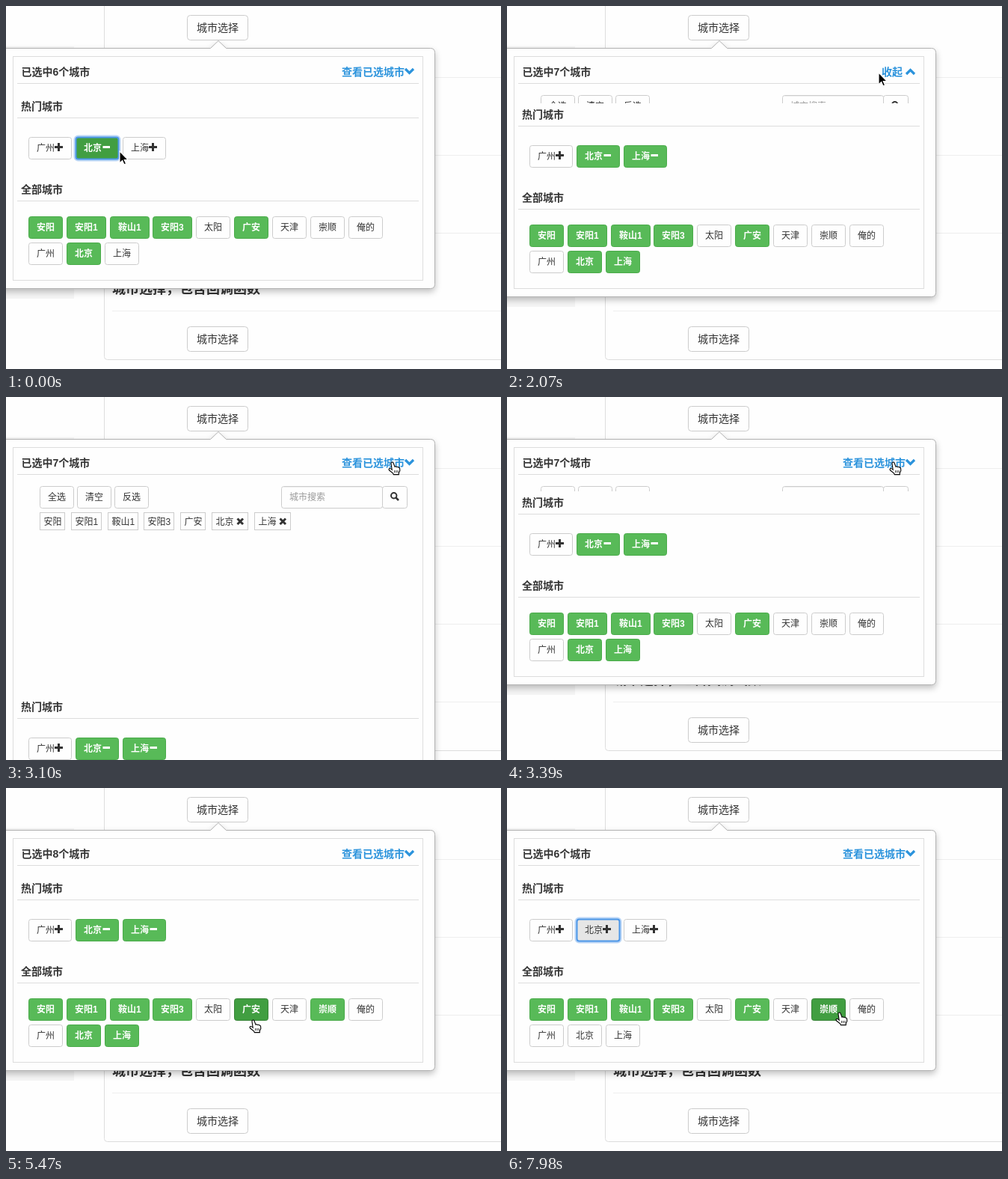
An HTML page that plays this animation: 662x485 px, repeating every 8000 ms.

```html
<!DOCTYPE html>
<html lang="zh-CN">
<head>
<meta charset="utf-8">
<title>城市选择</title>
<style>
html, body { margin: 0; width: 100%; height: 100%; overflow: hidden; background: #fefefe; }
svg { display: block; font-family: "Liberation Sans", "Noto Sans CJK SC", "Noto Sans CJK", sans-serif; }
.popover { filter: drop-shadow(0 4px 4px rgba(0, 0, 0, .24)); }
</style>
</head>
<body>
<svg id="stage" width="662" height="485" viewBox="0 0 662 485"></svg>
<script>
const stage = document.getElementById('stage');
const LOOP = 8000, STEP = 147.35;   // the screen is refreshed once per STEP
const OPEN_AT = 2014, CLOSE_AT = 3028, SLIDE = 400, PANEL = 300;
const BG = '#fefefe', INK = '#333', BLUE = '#2b93dc';

// pointer hot spot: [step, x, y]
const POINTER = [
  [0, 152, 194], [1, 166, 188], [2, 178, 185], [5, 186, 183], [6, 235, 166],
  [8, 365, 128], [10, 472, 98], [11, 472, 98], [12, 489, 91], [13, 496, 89],
  [14, 497, 89], [15, 503, 89], [17, 513, 89], [19, 516, 87], [23, 516, 87],
  [24, 510, 108], [25, 480, 180], [27, 418, 291], [28, 411, 298], [29, 408, 300],
  [30, 398, 300], [32, 340, 299], [33, 340, 299], [34, 350, 346], [35, 350, 346],
  [37, 330, 310], [40, 232, 222], [42, 178, 184], [44, 178, 184], [45, 165, 186],
  [46, 122, 187], [48, 120, 189], [49, 122, 205], [50, 128, 255], [51, 142, 300],
  [52, 230, 301], [53, 370, 301], [54, 444, 300]
];

// focused button: [from step, name]
const FOCUS = [[0, 'hot北京'], [3, 'hot上海'], [6, ''], [29, '崇顺'], [31, ''], [43, 'hot上海'], [47, 'hot北京']];

const HOT = ['广州', '北京', '上海'];
const CITIES = ['安阳', '安阳1', '鞍山1', '安阳3', '太阳', '广安', '天津', '崇顺', '俺的', '广州', '北京', '上海'];
const ALWAYS_ON = ['安阳', '安阳1', '鞍山1', '安阳3', '广安'];

const textWidth = name => name.length > 2 ? 30.67 : 24;

const buttons = HOT.map((name, i) => ({ name, id: 'hot' + name, hot: true, x: 30 + 63 * i, y: 175, w: 58 }));
let nextX = 30;
CITIES.forEach((name, i) => {
  if (i === 9) nextX = 30;
  const w = textWidth(name) + 22;
  buttons.push({ name, id: name, x: Math.round(nextX), y: i < 9 ? 281 : 316, w: Math.round(w) });
  nextX += w + 5;
});

const text = (s, x, y, size = 12, fill = INK, weight = 400) =>
  `<text x="${x}" y="${y}" font-size="${size}" fill="${fill}" font-weight="${weight}">${s}</text>`;
const box = (x, y, w, h, fill, stroke, r = 0, extra = '') =>
  `<rect x="${x + .5}" y="${y + .5}" width="${w - 1}" height="${h - 1}" rx="${r}" fill="${fill}" stroke="${stroke}" ${extra}/>`;
const hline = (x1, x2, y, color) => `<path d="M${x1} ${y + .5}H${x2}" stroke="${color}"/>`;
const line = (d, color, width) => `<path d="${d}" fill="none" stroke="${color}" stroke-width="${width}"/>`;
const plainButton = (s, x, y) => box(x, y, 46, 30, BG, '#ccc', 3) + text(s, x + 11, y + 19);
const inside = (p, b, off) => p.x >= b.x && p.x < b.x + b.w && p.y >= b.y + off && p.y < b.y + off + 30;

function pointerAt(k) {
  const i = Math.max(1, POINTER.findIndex(p => p[0] >= k));
  const [k0, x0, y0] = POINTER[i - 1], [k1, x1, y1] = POINTER[i];
  const f = (k - k0) / (k1 - k0);
  return { x: Math.round(x0 + (x1 - x0) * f), y: Math.round(y0 + (y1 - y0) * f) };
}

const swing = (t, start) => {
  const p = Math.min(1, Math.max(0, (t - start) / SLIDE));
  return .5 - Math.cos(p * Math.PI) / 2;
};

function isOn(name, k) {
  if (name === '上海') return k >= 3 && k < 44;
  if (name === '北京') return k < 47;
  if (name === '崇顺') return k >= 29;
  return ALWAYS_ON.includes(name);
}

function page(off) {
  const trigger = y => box(242, y, 82, 34, BG, '#ccc', 4) + text('城市选择', 255, y + 22, 14);
  return `<rect y="54" width="91" height="${337 + off}" fill="#f5f5f5"/>`
    + line('M131.5 0V468.5Q131.5 472.5 135.5 472.5H662', '#ddd', 1)
    + [95, 199, 303, 407].map(y => hline(142, 662, y, '#eee')).join('')
    + text('城市选择，包含回调函数', 142, 384, 18, INK, 700)
    + trigger(12) + trigger(428);
}

function popover(off) {
  const bottom = 377.5 + off;
  return `<path class="popover" fill="${BG}" stroke="#b2b2b2" d="M-8 56.5H273.5L284 46.5L294.5 56.5H567.5
    Q573.5 56.5 573.5 62.5V${bottom - 6}Q573.5 ${bottom} 567.5 ${bottom}H-8Z"/>`
    + box(9, 67, 549, 300 + off, 'none', '#ddd');
}

function header(k, open) {
  const count = CITIES.filter(c => isOn(c, k)).length;
  return text(`已选中${count}个城市`, 20.5, 93, 14, INK, 700)
    + text(open ? '收起' : '查看已选城市', open ? 501 : 449, 93, 14, BLUE, 700)
    + line(open ? 'M534 91L539.5 85.5L545 91' : 'M534 84L539.5 89.5L545 84', BLUE, 3.2)
    + hline(15, 552, 103, '#ddd');
}

function panel(k, off) {
  let x = 45;
  const tags = CITIES.filter(c => isOn(c, k)).map(name => {
    const hot = HOT.includes(name), left = Math.round(x);
    const w = textWidth(name) + (hot ? 25.3 : 10);
    x += w + 8;
    return box(left, 154, Math.round(w), 24, BG, '#ccc') + text(name, left + 5.5, 171)
      + (hot ? line(`M${left + 34.5} 162.5l7.5 7.5m0-7.5l-7.5 7.5`, INK, 3) : '');
  }).join('');
  return `<clipPath id="slide"><rect y="119" width="662" height="${off}"/></clipPath><g clip-path="url(#slide)">`
    + plainButton('全选', 45, 119) + plainButton('清空', 95, 119) + plainButton('反选', 145, 119)
    + box(368, 119, 136, 30, BG, '#ccc', 3) + hline(370, 502, 120, '#eee')
    + text('城市搜索', 379, 138, 12, '#999')
    + box(503, 119, 34, 30, BG, '#ccc', 3)
    + `<circle cx="518.7" cy="131.8" r="3.7" fill="none" stroke="${INK}" stroke-width="2"/>`
    + line('M521.3 134.4L525 138', INK, 2.6) + tags + '</g>';
}

function cityButton(b, k, hover, focused) {
  const on = isOn(b.name, k), active = hover || focused;
  const fill = on ? (active ? '#419e41' : '#58ba58') : active ? '#e6e6e6' : BG;
  const edge = on ? (active ? '#398439' : '#4aab4a') : active ? '#adadad' : '#ccc';
  const ink = on ? '#fff' : INK, cx = b.x + 40.5, cy = b.y + 13.5;
  let out = '';
  if (focused) {
    out += box(b.x - 1, b.y - 1, b.w + 2, 32, 'none', '#8fbdf2', 4, 'stroke-width="4" opacity=".6"');
  }
  out += box(b.x, b.y, b.w, 30, fill, focused ? '#4d97e8' : edge, 3, focused ? 'stroke-width="2"' : '');
  out += text(b.name, b.x + 11, b.y + 19, 12, ink, on ? 700 : 400);
  if (b.hot) {
    out += on ? line(`M${cx - 4} ${cy}h9.5`, ink, 3) : line(`M${cx - 5.5} ${cy}h11M${cx} ${cy - 5.5}v11`, ink, 3);
  }
  return out;
}

function cursor(p, hand) {
  const d = hand
    ? 'M-.2.3Q1.2-.5 2 1L4 6.2Q5.4 5.2 6.5 6.6Q8 5.6 9 7.2Q10.4 6.7 10.6 8.6L10.8 11.5L9.3 14.5V16.6H2.3L1.7 15L-3.6 10.8Q-4.6 9.2-3 8.6Q-1.8 8.3.2 10.2L-1 2Q-1.2.7-.2.3Z'
    : 'M0 0V15.8L3.6 12.4L6 17.8L8.6 16.7L6.2 11.5H11.2Z';
  const creases = hand ? line('M3.6 11v3.2M5.8 11v3.2M8 11v3.2', '#000', .8) : '';
  return `<g transform="translate(${p.x} ${p.y})"><path d="${d}" fill="${hand ? '#fff' : '#000'}" stroke="${hand ? '#000' : '#fff'}" stroke-width="1.1"/>${creases}</g>`;
}

function scene(k) {
  const t = k * STEP;
  const open = t >= OPEN_AT && t < CLOSE_AT;
  const off = Math.round(PANEL * (swing(t, OPEN_AT) - swing(t, CLOSE_AT)));
  const p = pointerAt(k);
  const focus = FOCUS.filter(f => f[0] <= k).pop()[1];
  const link = { x: open ? 501 : 449, y: 78, w: open ? 45 : 97 };
  const over = buttons.find(b => inside(p, b, off));
  const onLink = inside(p, link, 0) && p.y < 100;
  const section = (s, y) => text(s, 20, y, 14, INK, 700) + hline(15, 552, y + 10, '#ddd');
  return page(off) + popover(off) + header(k, open) + panel(k, off)
    + `<g transform="translate(0 ${off})">` + section('热门城市', 139) + section('全部城市', 250)
    + buttons.map(b => cityButton(b, k, b === over, b.id === focus)).join('') + '</g>'
    + cursor(p, over || onLink);
}

let shown = -1;
function draw() {
  const k = Math.floor(performance.now() % LOOP / STEP);
  if (k !== shown) stage.innerHTML = scene(shown = k);
  requestAnimationFrame(draw);
}
draw();
</script>
</body>
</html>
```
